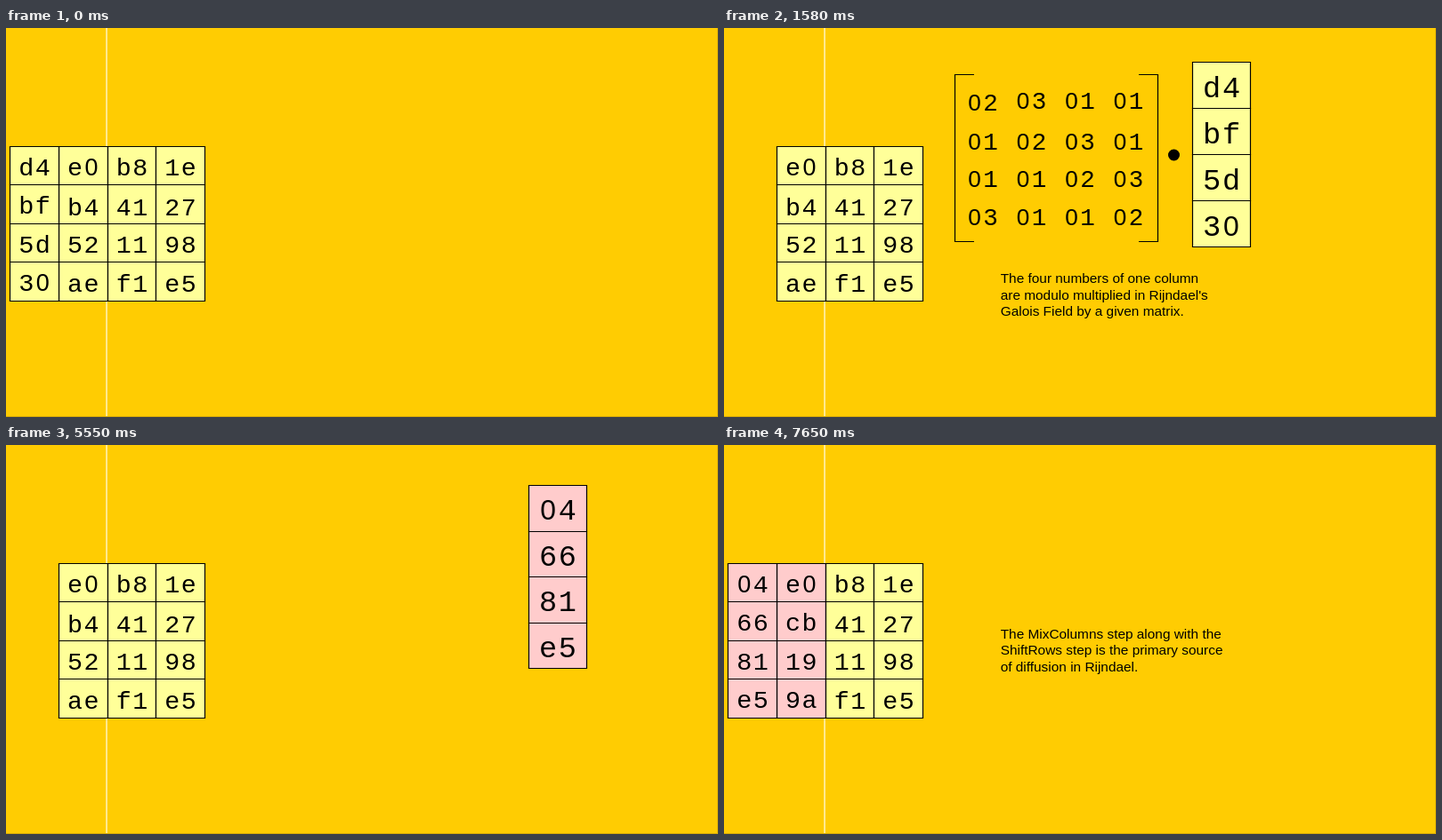
These frames come from a looping animation (800x438 px, 8000 ms). An HTML page with a canvas:

```html
<!DOCTYPE html>
<html lang="en">
<head>
<meta charset="utf-8">
<title>MixColumns</title>
<style>
html, body { margin: 0; height: 100%; overflow: hidden; background: #fc0; }
canvas { display: block; }
</style>
</head>
<body>
<canvas width="800" height="438"></canvas>
<script>
const ctx = document.querySelector('canvas').getContext('2d');
const LOOP = 8000, YELLOW = '#ffff99', PINK = '#ffcccc';
const words = s => s.split(' ');

const table = ['e0 b4 52 ae', 'b8 41 11 f1', '1e 27 98 e5'].map(words);
const mixed = words('e0 cb 19 9a');
const input = words('d4 bf 5d 30');
const output = words('04 66 81 e5');
const matrix = ['02 03 01 01', '01 02 03 01', '01 01 02 03', '03 01 01 02'].map(words);
const fieldNote = [
  'The four numbers of one column',
  "are modulo multiplied in Rijndael's",
  'Galois Field by a given matrix.'
];
const mixNote = [
  'The MixColumns step along with the',
  'ShiftRows step is the primary source',
  'of diffusion in Rijndael.'
];

// Column poses: left, top, cell width, cell height
const home = [4.5, 133.5, 55, 43.4];
const factor = [526.5, 38.5, 65, 52.1];
const product = [636.5, 38.5, 65.5, 52.1];

const clamp = v => Math.max(0, Math.min(1, v));
const snap = v => Math.floor(v) + 0.5;

// Progress in discrete steps, the first of which is taken at the start time
const stepped = (t, start, ms, count) => clamp((Math.floor((t - start) / ms) + 1) / count);

function move(from, to, p) {
  const e = p + 0.58 * (p * p * (3 - 2 * p) - p);
  return from.map((v, i) => v + (to[i] - v) * e);
}

// The sans zero has no dot inside
function hexFont(ch, size) {
  if (ch === '0') return size * 0.9 + 'px "Liberation Sans", Arial, sans-serif';
  return size * 0.95 + 'px "Liberation Mono", monospace';
}

function hex(text, x, y, size) {
  ctx.fillStyle = '#000';
  ctx.textAlign = 'center';
  [...text].forEach((ch, i) => {
    ctx.font = hexFont(ch, size);
    ctx.fillText(ch, x + (i - 0.5) * size * 0.62, y);
  });
}

function column(values, [x, y, w, h], color, nudge = [0, 0, 0, 0]) {
  values.forEach((value, i) => {
    const left = snap(x), top = snap(y + i * h);
    ctx.fillStyle = color;
    ctx.strokeStyle = '#000';
    ctx.lineWidth = 1.2;
    ctx.beginPath();
    ctx.rect(left, top, snap(x + w) - left, snap(y + (i + 1) * h) - top);
    ctx.fill();
    ctx.stroke();
    hex(value, x + w / 2, y + (i + 0.75) * h + nudge[i], w * 30 / 55);
  });
}

function note(lines, y) {
  ctx.fillStyle = '#000';
  ctx.textAlign = 'left';
  ctx.font = '15.4px "Liberation Sans", Arial, sans-serif';
  lines.forEach((line, i) => ctx.fillText(line, 310.7, y + i * 18.5));
}

function path(...points) {
  ctx.beginPath();
  points.forEach(p => ctx.lineTo(...p));
  ctx.stroke();
}

function equation() {
  matrix.forEach((row, r) => row.forEach((value, c) =>
    hex(value, 290.5 + c * 54.5, [91, 137, 179, 222][r] + (r + c ? 0 : 1.5), 29)));
  ctx.strokeStyle = '#000';
  ctx.lineWidth = 1.2;
  path([281, 52.5], [259.5, 52.5], [259.5, 240.5], [281, 240.5]);
  path([466, 52.5], [487.5, 52.5], [487.5, 240.5], [466, 240.5]);
  ctx.beginPath();
  ctx.arc(505.5, 143, 6.5, 0, 7);
  ctx.fill();
  note(fieldNote, 287);
}

function equals() {
  ctx.strokeStyle = '#000';
  ctx.lineWidth = 1.6;
  path([609.5, 139.5], [626, 139.5]);
  path([609.5, 146], [626, 146]);
}

function draw(t) {
  const fadeOut = 1 - stepped(t, 5310, 60, 5);

  ctx.globalAlpha = 1;
  ctx.fillStyle = '#ffcc02';
  ctx.fillRect(0, 0, 800, 438);
  ctx.fillStyle = '#fff3bf';
  ctx.fillRect(112.3, 0, 1.5, 438);
  ctx.fillStyle = '#d8ab06';
  ctx.fillRect(0, 437, 800, 1);
  ctx.fillRect(799, 0, 1, 438);

  table.forEach((values, i) => {
    const pose = [59.5 + i * 54.6, 133.5, 54.6, 43.4];
    if (i === 0 && t >= 7650) column(mixed, pose, PINK);
    else column(values, pose, YELLOW, [0, 2, 0, 1]);
  });

  ctx.globalAlpha = fadeOut;
  column(input, move(home, factor, stepped(t, 500, 59, 10.4)), YELLOW);
  if (t >= 3760) equals();
  ctx.globalAlpha = Math.min(fadeOut, stepped(t, 1280, 75, 5));
  equation();

  ctx.globalAlpha = 1;
  if (t >= 3820) column(output, move(product, home, stepped(t, 5550, 60, 8)), PINK);
  ctx.globalAlpha = stepped(t, 5730, 60, 5);
  note(mixNote, 217.5);
}

function frame() {
  draw(performance.now() % LOOP);
  requestAnimationFrame(frame);
}
frame();
</script>
</body>
</html>
```
